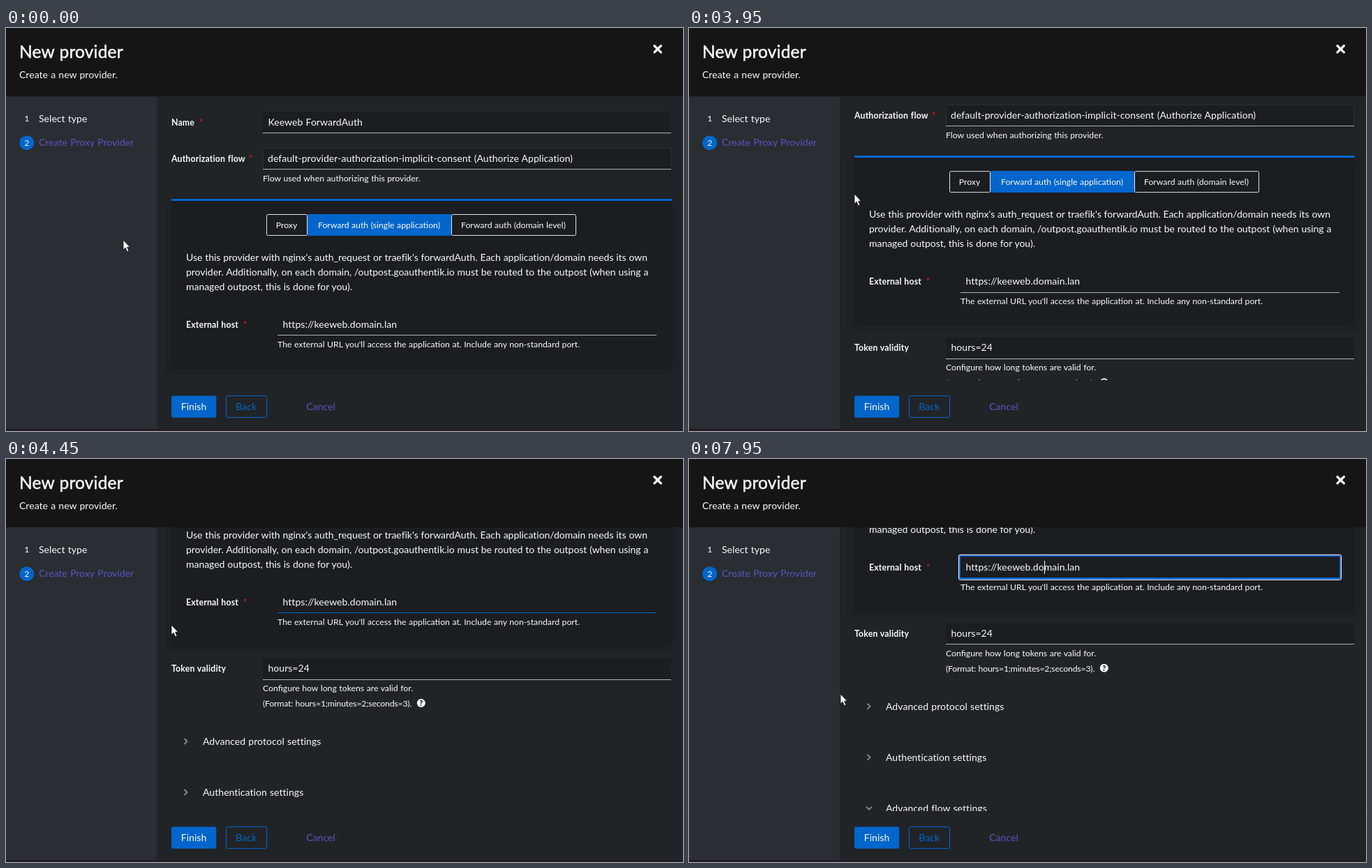
An HTML page for the animation above (8 s loop, 970x578 px).

```html
<!DOCTYPE html>
<html lang="en">
<head>
<meta charset="utf-8">
<title>New provider</title>
<style>
  html, body { margin: 0; width: 100%; height: 100%; overflow: hidden; background: #212427; }
  svg { display: block; }
  text { font: 14px Lato, "Open Sans", sans-serif; fill: #fafafa; letter-spacing: .05px; word-spacing: .5px; white-space: pre; }
  .p { letter-spacing: -.03px; word-spacing: .3px; }
  .s { font-size: 12.25px; letter-spacing: 0; word-spacing: .4px; }
  .b { font-size: 12.25px; font-weight: 700; letter-spacing: .18px; }
  .tight { letter-spacing: -.18px; }
  .mid { text-anchor: middle; }
  .title { font-size: 24.5px; letter-spacing: .2px; stroke: #fafafa; stroke-width: .5; }
  .req { font-size: 12.25px; font-weight: 700; fill: #c9190b; }
  .link { fill: #5a54c0; }
  .box { fill: #1b1d21; }
  .line { fill: #b0b2b4; }
  .line.hover { fill: #06c; }
  .blue { fill: #06c; }
  #form .box, #form .line, #form .blue { shape-rendering: crispEdges; }
  .outline { fill: none; stroke: #e4e4e4; }
  .chev { fill: none; stroke: #8a8d90; stroke-width: 1.8; }
  .ring { fill: none; stroke: #0b6be0; stroke-width: 2; }
  .ring + rect { fill: none; stroke: #fff; }
</style>
</head>
<body>
<svg width="970" height="578" viewBox="0 0 970 578">
  <defs>
    <filter id="soft" x="-5%" y="-10%" width="110%" height="120%"><feGaussianBlur stdDeviation="4"/></filter>
  </defs>
  <rect width="970" height="578" fill="#212427"/>

  <g id="form">
    <text class="b" x="237" y="140">Name</text>
    <text class="req" x="277" y="140">*</text>
    <rect class="box" x="368" y="120" width="585" height="31"/>
    <rect class="line" id="nameLine" x="368" y="150" width="585" height="1"/>
    <text x="375.5" y="140">Keeweb ForwardAuth</text>
    <g id="nameFocus">
      <rect class="ring" x="367" y="119" width="587" height="32" rx="1"/>
      <rect x="365.5" y="117.5" width="590" height="35" rx="2"/>
    </g>
    <rect id="nameCaret" x="508" y="125" width="1" height="19" fill="#fff"/>

    <text class="b" x="237" y="192">Authorization flow</text>
    <text class="req" x="348" y="192">*</text>
    <rect class="box" x="368.5" y="172.5" width="584" height="30" stroke="#2b2e33"/>
    <rect class="line" id="flowLine" x="368" y="202" width="585" height="1"/>
    <text x="375" y="192">default-provider-authorization-implicit-consent (Authorize Application)</text>
    <text class="s" x="368" y="220">Flow used when authorizing this provider.</text>

    <rect x="236" y="250" width="719" height="240" fill="#16181b" opacity=".6" filter="url(#soft)"/>
    <rect class="box" x="237" y="248" width="717" height="238"/>
    <rect class="blue" x="237" y="245" width="717" height="3"/>
    <rect class="outline" x="373.5" y="267.5" width="58" height="30" rx="2"/>
    <rect class="outline" x="638.5" y="267.5" width="178" height="30" rx="2"/>
    <rect class="blue" x="432" y="267" width="206" height="31"/>
    <text class="s mid" x="402" y="287">Proxy</text>
    <text class="s mid" x="534.5" y="287">Forward auth (single application)</text>
    <text class="s mid" x="727" y="287">Forward auth (domain level)</text>
    <text class="p" x="258" y="334">Use this provider with nginx's auth_request or traefik's forwardAuth. Each application/domain needs its own</text>
    <text class="p" x="258" y="355">provider. Additionally, on each domain, /outpost.goauthentik.io must be routed to the outpost (when using a</text>
    <text class="p" x="258" y="376">managed outpost, this is done for you).</text>

    <text class="b" x="258" y="430">External host</text>
    <text class="req" x="340" y="430">*</text>
    <rect class="line" id="hostLine" x="389" y="440.4" width="543" height="1"/>
    <text x="396.5" y="430">https://keeweb.domain.lan</text>
    <g id="hostFocus">
      <rect class="ring" x="388" y="409" width="545" height="33" rx="1"/>
      <rect x="386.5" y="407.5" width="548" height="36" rx="2"/>
    </g>
    <rect id="hostCaret" x="509" y="416" width="1" height="19" fill="#fff"/>
    <text class="s" x="389" y="458">The external URL you'll access the application at. Include any non-standard port.</text>

    <text class="b" x="237" y="525">Token validity</text>
    <rect class="box" x="368" y="505.6" width="585" height="30"/>
    <rect class="line" x="368" y="535.6" width="585" height="1"/>
    <text x="375.5" y="525">hours=24</text>
    <text class="s" x="368" y="553">Configure how long tokens are valid for.</text>
    <text class="s tight" x="368" y="575">(Format: hours=1;minutes=2;seconds=3).</text>
    <circle cx="594.8" cy="570" r="6" fill="#fafafa"/>
    <text class="b mid" x="594.8" y="574" style="font-size:10.5px;font-weight:900;fill:#212427">?</text>

    <path class="chev" d="M255.5 621l4 4-4 4M255.5 694l4 4-4 4M254 769l4 4 4-4"/>
    <text x="282" y="630">Advanced protocol settings</text>
    <text x="282" y="703">Authentication settings</text>
    <text x="282" y="776">Advanced flow settings</text>
  </g>

  <rect x="216" y="505" width="754" height="1" fill="#1c1f22"/>
  <rect x="216" y="506" width="754" height="72" fill="#212427"/>
  <rect class="blue" x="237" y="527.5" width="64.3" height="31.2" rx="2.5"/>
  <text class="mid" x="269" y="548">Finish</text>
  <rect x="315.5" y="527.5" width="58" height="31" rx="2.5" fill="none" stroke="#06c"/>
  <text class="mid blue" x="344.3" y="548">Back</text>
  <text class="mid link" x="451" y="548">Cancel</text>

  <rect y="98" width="216" height="480" fill="#2a2d32"/>
  <text class="s mid" x="29.7" y="134">1</text>
  <text x="47" y="135">Select type</text>
  <circle class="blue" cx="29.7" cy="164.7" r="10.5"/>
  <text class="s mid" x="29.7" y="169">2</text>
  <text class="link" x="47" y="169">Create Proxy Provider</text>

  <rect width="970" height="98" fill="#151515"/>
  <text class="title" x="19" y="43">New provider</text>
  <text x="19" y="72">Create a new provider.</text>
  <path d="M929 25.5l9.4 9.4M938.4 25.5l-9.4 9.4" stroke="#fff" stroke-width="3.2" stroke-linecap="round"/>
  <rect y="575" width="970" height="3" fill="#241c23"/>

  <g id="mouse">
    <path id="arrow" d="M0 0V14.2L3.2 11.2 5.5 16.7 7.9 15.7 5.6 10.3H9.6Z" fill="#fff" stroke="#111" stroke-width=".8"/>
    <path id="beam" d="M-3-6.5H-.8L0-5.8.8-6.5H3M0-6V6M-3 6.5H-.8L0 5.8.8 6.5H3" fill="none" stroke="#e8e8e8"/>
  </g>
</svg>
<script>
  const LOOP = 8000, STEP = 50, BLINK = 530;
  const $ = id => document.getElementById(id);

  // [start, end, ...values reached at the end]
  const moves = [
    [0, 0, 168, 304],
    [700, 1550, 557.5, 131],
    [2200, 2900, 470.5, 187],
    [3100, 3200, 468, 188.5],
    [3450, 3850, 237, 238],
    [5150, 5650, 511, 208],
    [6500, 6900, 213, 237],
    [7600, 7850, 217, 337]
  ];
  const scrolls = [
    [0, 0, 0],
    [3820, 4060, 110],
    [4210, 4450, 220],
    [7837, 8077, 330]
  ];

  const ease = u => u * u * (3 - 2 * u);

  function at(keys, t) {
    let pos = keys[0].slice(2);
    for (const [a, b, ...to] of keys.slice(1)) {
      if (t <= a) break;
      const k = ease(Math.min(1, (t - a) / (b - a)));
      pos = pos.map((v, i) => v + (to[i] - v) * k);
    }
    return pos;
  }

  const show = (id, on) => $(id).setAttribute('visibility', on ? 'visible' : 'hidden');
  const caretOn = (t, from) => t >= from && Math.floor((t - from) / BLINK) % 2 === 0;

  function draw(now) {
    const t = Math.floor(now % LOOP / STEP) * STEP;
    const [x, y] = at(moves, t);
    const [top] = at(scrolls, t);
    const over = (l, r, a, b) => x >= l && x < r && y + top >= a && y + top < b;
    const name = over(368, 953, 120, 151);
    const flow = over(368, 953, 172, 203);
    const host = over(389, 932, 410, 441);
    const onName = t >= 1600 && t < 5800, onHost = t >= 5800;

    $('form').setAttribute('transform', `translate(0 ${-top})`);
    $('mouse').setAttribute('transform', `translate(${x} ${y})`);
    show('beam', name || flow || host);
    show('arrow', !(name || flow || host));

    $('nameLine').classList.toggle('hover', name || onName);
    $('flowLine').classList.toggle('hover', flow);
    $('hostLine').classList.toggle('hover', host || t >= 4450);
    show('nameFocus', onName);
    show('hostFocus', onHost);
    show('nameCaret', onName && caretOn(t, 1700));
    show('hostCaret', onHost && caretOn(t, 5800));
  }

  const begin = performance.now();
  function tick() {
    draw(performance.now() - begin);
    requestAnimationFrame(tick);
  }
  tick();
</script>
</body>
</html>
```
